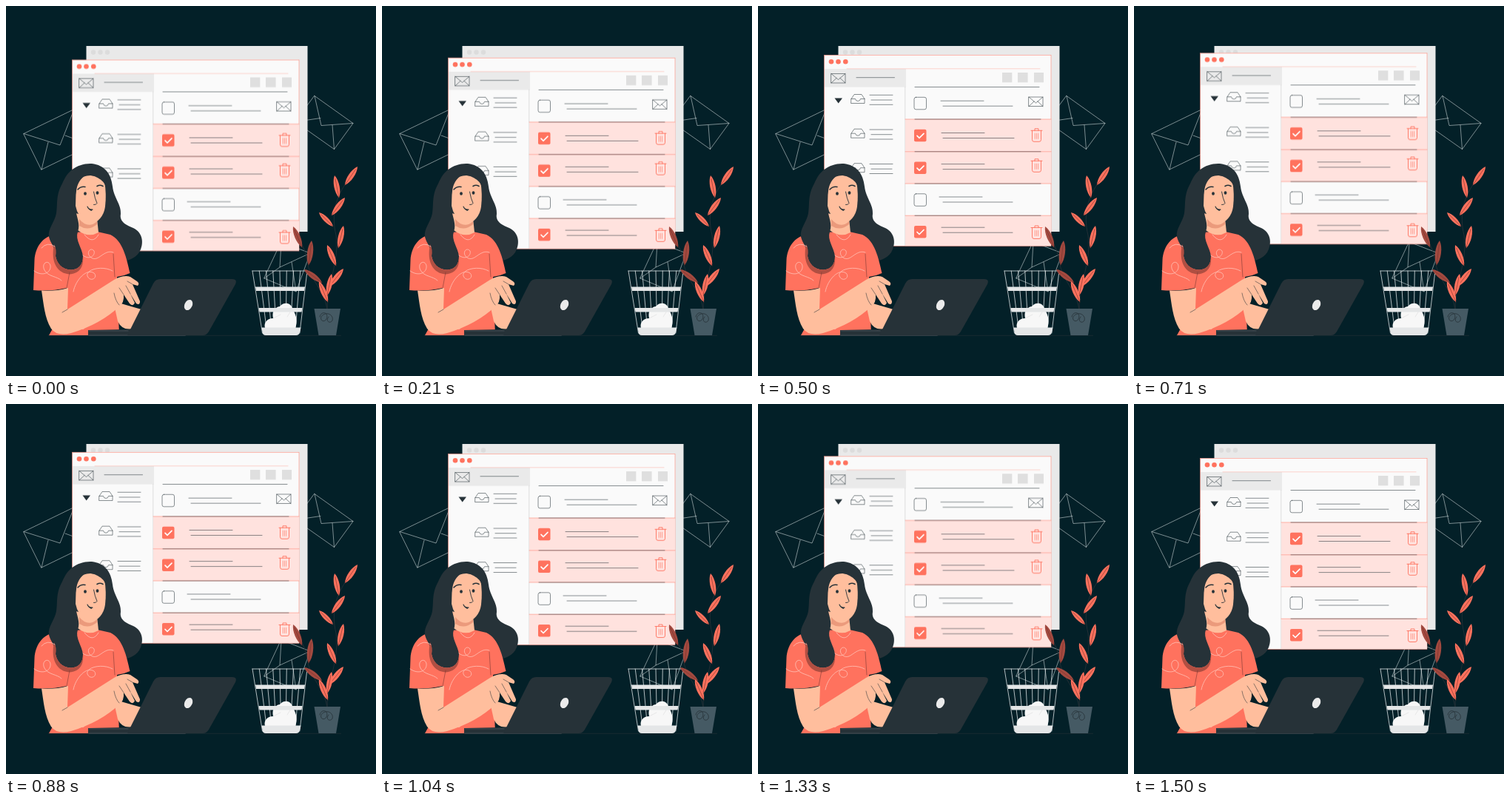
An HTML page for the animation above (1.54 s loop, 500x500 px).

```html
<!DOCTYPE html>
<html lang="en">
<head>
<meta charset="utf-8">
<title>Cleaning the inbox</title>
<style>
  html, body { margin: 0; height: 100%; overflow: hidden; background: #032028; }
  svg { display: block; width: 100vw; height: 100vh; }
  .line { fill: none; stroke-linecap: round; stroke-linejoin: round; }
  .dark { stroke: #263238; stroke-width: .55; }
  .pale { stroke: #dfe5e6; stroke-width: .55; }
  .coral { stroke: #ff725e; stroke-width: .9; }
  .edge { stroke: #ff725e; stroke-width: .5; }
  .swirl { stroke: #ffc3b8; stroke-width: .8; }
  .skin { fill: #ffbe9d; }
  .hair { fill: #263238; }
  .shirt { fill: #ff725e; }

  /* 37 poses per loop, linear up and down */
  #window { animation: float 1540ms infinite; }
  @keyframes float {
    0% { transform: translateY(-.54px); animation-timing-function: steps(18, end); }
    48.648% { transform: translateY(-10.27px); }
    48.649% { transform: translateY(-9.73px); animation-timing-function: steps(19, end); }
    100% { transform: translateY(.54px); }
  }
</style>
</head>
<body>
<svg viewBox="0 0 500 500" xmlns="http://www.w3.org/2000/svg">
  <defs>
    <g id="mail" class="line dark">
      <path d="M0 0H19V12.500H0ZL9.500 8L19 0M0 12.500L7 6M19 12.500L12 6"/>
    </g>
    <g id="tray" class="line dark">
      <path d="M0 6L4 0H14L18 6V12H0ZH5.500Q6 9 9 9T12.500 6H18"/>
    </g>
    <g id="bin" class="line coral">
      <path d="M0 3H15M5 3V.5H10V3M1.500 3V15.500Q1.500 18 4 18H11Q13.500 18 13.500 15.500V3"/>
      <path d="M5.300 7V14M7.500 7V14M9.700 7V14" stroke-width=".6"/>
    </g>
    <rect id="box" width="16.500" height="16.500" rx="2.500" class="line dark"/>
    <g id="check">
      <rect width="16.500" height="16.500" rx="2" fill="#ff725e"/>
      <path d="M4 8.500L7 11.500L13 5.500" class="line" stroke="#fff" stroke-width="1.700"/>
    </g>
  </defs>

  <rect width="500" height="500" fill="#032028"/>
  <path d="M57 445.300H453" stroke="#263238" stroke-width=".6"/>

  <g class="line pale">
    <path d="M24 172.500L92 139.500L116 188L48 221ZL73 188L92 139.500M48 221L57 184M116 188L80 175"/>
    <path d="M417 121.500L469 158.500L443.500 193.500L391 156.500ZL426 161.500L469 158.500M443.500 193.500L441 161M391 156.500L425 151.500"/>
    <path d="M372 319L411 334L392 386L349 368ZL370 353L411 334M392 386L386 346M349 368L370 353"/>
  </g>

  <rect x="108.500" y="54" width="299" height="251" fill="#e9e9e9"/>
  <g fill="#dcdcdc">
    <circle cx="118" cy="62.500" r="3.200"/><circle cx="127.500" cy="62.500" r="3.200"/><circle cx="137" cy="62.500" r="3.200"/>
  </g>

  <g id="window">
    <rect x="89.500" y="73.300" width="306.500" height="258" fill="#fafafa" stroke="#ff8d7d" stroke-width=".6"/>
    <g fill="#ff725e">
      <circle cx="99" cy="82.200" r="3.300"/><circle cx="108.500" cy="82.200" r="3.300"/><circle cx="118.300" cy="82.200" r="3.300"/>
    </g>
    <rect x="90" y="92" width="110" height="24.500" fill="#eaeaea"/>
    <path d="M198.800 116V331" stroke="#c9c9c9" stroke-width=".6"/>
    <path d="M120 91.800H381" class="line edge" opacity=".6"/>
    <path d="M133 103.700H184.500M212 116.500H380" class="line dark"/>
    <use href="#mail" x="99" y="98.500"/>
    <path d="M103.500 131.500H114L108.700 138.500Z" fill="#263238"/>
    <g fill="#dfdfdf">
      <rect x="330" y="97" width="13.300" height="13.300"/><rect x="351" y="97" width="13.600" height="13.300"/><rect x="373" y="97" width="13" height="13.300"/>
    </g>
    <g id="folders"></g>
    <g id="rows"></g>
  </g>

  <!-- woman -->
  <path class="hair" d="M76 244C79 224 97 212 116 213C133 215 142 226 144 244C146 260 156 268 155 281C153 292 163 296 172 300C185 306 187 321 180 333C171 346 151 348 140 342L98 318L80 285Z"/>
  <path class="shirt" d="M68 308C48 312 40 326 38.500 343L37 384Q60 386 82 381L80 405L58 445H153L150 366Q159 365 167.500 361C163 341 158 317 141 309L119 304Z"/>
  <path class="skin" d="M94 280L97 303Q111 314 125 306L123 287Z"/>
  <path d="M99 288Q111 302 123 291L123 295Q111 305 99 297Z" fill="#eb9a7c"/>
  <path class="skin" d="M95 236Q114 222 133 236Q136 254 134 271C132 287 120 297 109 292Q97 286 94 270Z"/>
  <path class="hair" d="M135 246C134 236 122 229 109 228C100 233 96 241 95 250Q92 262 94 273C95 286 101 294 97 305C93 316 103 327 104 338C104 349 99 356 88 356.500C75 356 69 348 67 338C68 328 60 321 58 312C56 301 66 292 68 280C70 267 67 256 76 240C86 217 115 212 130 221Q138 232 135 246Z"/>
  <path d="M65 322Q69 330 67 338C69 348 75 356 88 356.500C99 356 104 349 104 338Q106 360 87 362.500C69 362 60 346 65 322Z" fill="#b14f42"/>
  <g class="line dark">
    <path d="M97 248Q101 243.500 107 244.500M123 243.500Q127 241 131 243.500" stroke-width="1.500"/>
    <path d="M118.500 251Q120 260 123 266.500Q122 269 118.500 268.500" stroke-width=".9"/>
    <path d="M110 271Q112 276 117 275" stroke-width="1.100"/>
  </g>
  <path d="M111 272Q112 275.500 117 274.800L115.500 277Q112 276 111 272Z" fill="#263238"/>
  <ellipse cx="107" cy="253.500" rx="1.900" ry="2.200" fill="#263238"/>
  <ellipse cx="123.500" cy="252.500" rx="1.900" ry="2.200" fill="#263238"/>
  <g class="line swirl">
    <path d="M38 358C49 366 61 361 60 351C58 342 47 347 52 357C57 366 69 365 75 371M48 327Q56 318 66 325"/>
    <path d="M104 337C113 344 121 337 119 331C114 325 107 334 115 340C125 347 132 328 145 333M106 309Q117 323 125 309"/>
    <path d="M91 386C94 370 109 354 119 361C125 367 114 374 110 365C107 356 130 350 144 358M89 440C94 424 110 424 107 434C102 442 96 430 105 424"/>
  </g>
  <path d="M82 381L86 360M145 335L147 366" class="line" stroke="#7b3a35" stroke-width=".6"/>
  <path class="skin" d="M145 399L183 410L171 436Q157 439 151 426Z"/>
  <path class="skin" d="M48 384.500Q66 386 84 381L83 410L146 370C154 365 163 364 168 366L177 372Q181 375 178 378L171 376L181 399Q181 405 176 402L168 389L174 401Q172 407 167 402L159 390Q160 401 153 406Q128 430 88 442Q69 447 61 436C52 421 51 403 48 384.500Z"/>
  <path d="M83 410L76 414M146 388Q148 399 153 404M159 390L153 381M168 389L162 378M171 376L164 372" class="line dark"/>

  <!-- laptop -->
  <path d="M111 438L186 436.500L243 444V446H111Z" fill="#263238"/>
  <path d="M112 439H165M112 445H242" class="line" stroke="#52616a" stroke-width=".6"/>
  <path d="M208 369H306Q313 369 310 376L274 440Q271 445 266 445H164L199 375Q202 369 208 369Z" fill="#263238"/>
  <ellipse cx="246.500" cy="404" rx="5.200" ry="7.500" transform="rotate(27 246.500 404)" fill="#ebebeb"/>

  <!-- waste basket -->
  <g id="basket" class="line" stroke="#eceff0" stroke-width=".75"></g>
  <path d="M350 435C348 428 353 422 361 422C359 413 363 407 370 406C375 399 386 401 387 409C393 418 394 428 391 435Z" fill="#f7f7f7"/>
  <path d="M361 422L371 417M387 409L380 420" class="line" stroke="#dcdcdc" stroke-width=".6"/>
  <g fill="#e4e6e7">
    <path d="M337 379.500H404L403 385H338Z"/>
    <path d="M341.500 408H400.500L399.500 413.500H342.500Z"/>
    <path d="M345.500 434.500H398.500L397 441Q396 445 392 445H351Q347 445 346.500 441Z"/>
  </g>

  <!-- plant -->
  <path d="M434 409C434 375 451 344 446 310C439 280 446 258 461 237M434 409C430 384 411 371 407 345Q405 329 397 318" class="line" stroke="#263238" stroke-width=".9"/>
  <g id="leaves"></g>
  <path d="M416.500 409H452L446 445H422.500Z" fill="#455a64"/>
  <path d="M424 420C426 411 437 414 433 423C429 430 421 422 429 417C436 413 443 419 441 425C438 430 431 426 436 420" class="line" stroke="#263238" stroke-width=".8"/>
</svg>

<script>
  const fill = (id, parts) => document.getElementById(id).innerHTML = parts.join("");
  const use = (id, x, y) => `<use href="#${id}" x="${x}" y="${y}"/>`;
  const path = (d, cls = "line dark") => `<path class="${cls}" d="${d}"/>`;

  // Sidebar folders
  fill("folders", [127.3, 174, 220.5].map(y =>
    use("tray", 126, y - .8) + path(`M151 ${y}H182M153 ${y + 6.7}H181M151 ${y + 13}H182`)));

  // Message rows; text is the first line, icon the top of the right-hand icon
  const rows = [
    { y: 116.5, text: 135.2, left: 247, right: 344, mail: 130 },
    { y: 160, text: 178.5, left: 248, right: 346, bin: 172.3 },
    { y: 203.8, text: 220.6, left: 248, right: 346, bin: 213.3 },
    { y: 247, text: 265, left: 245, right: 344 },
    { y: 290.2, text: 306.2, left: 248, right: 344, bin: 303.5 }
  ];
  fill("rows", rows.map(({ y, text, left, right, mail, bin }, i) => {
    const next = rows[i + 1]?.y ?? 331.1;
    const band = bin ? `<rect x="199" y="${y}" width="197" height="${next - y}" fill="#ffe2de"/>` : "";
    const rule = i ? path(`M199 ${y}H396`, "line edge") + path(`M212 ${y}H382`) : "";
    const icon = bin ? use("bin", 369, bin) : mail ? use("mail", 366, mail) : "";
    return band + rule + use(bin ? "check" : "box", 211, y + 13.8) + icon +
      path(`M${left} ${text}H${left + 58}M250 ${text + 7}H${right}`);
  }));

  // Basket wires
  const wires = Array.from({ length: 9 }, (_, i) => `M${333 + i * 9.25} 358L${346.5 + i * 6.3} 442`);
  fill("basket", [path("M333 358H407" + wires.join(""), "line")]);

  // Leaves: tip to base
  const leaf = (color, [x1, y1, x2, y2]) => {
    const dx = x2 - x1, dy = y2 - y1;
    const at = (t, s) => `${x1 + dx * t - dy * s} ${y1 + dy * t + dx * s}`;
    return `<path fill="${color}" d="M${x1} ${y1}C${at(.25, .16)} ${at(.75, .16)} ${x2} ${y2}C${at(.75, -.16)} ${at(.25, -.16)} ${x1} ${y1}Z"/>` +
      `<path class="line" stroke="#782f2b" stroke-width=".6" d="M${at(.15, 0)}L${at(1, 0)}"/>`;
  };
  const bright = [
    [475, 217, 458, 242], [444, 229, 450, 259], [458, 259, 440, 283], [423, 279, 442, 298], [456, 297, 449, 327],
    [434, 323, 446, 351], [456, 355, 437, 379], [440, 362, 434, 391], [423, 372, 435, 400]
  ];
  const shaded = [[388, 298, 400, 326], [413, 317, 409, 350], [403, 356, 427, 374]];
  fill("leaves", [...shaded.map(p => leaf("#a34a40", p)), ...bright.map(p => leaf("#ff725e", p))]);
</script>
</body>
</html>
```
